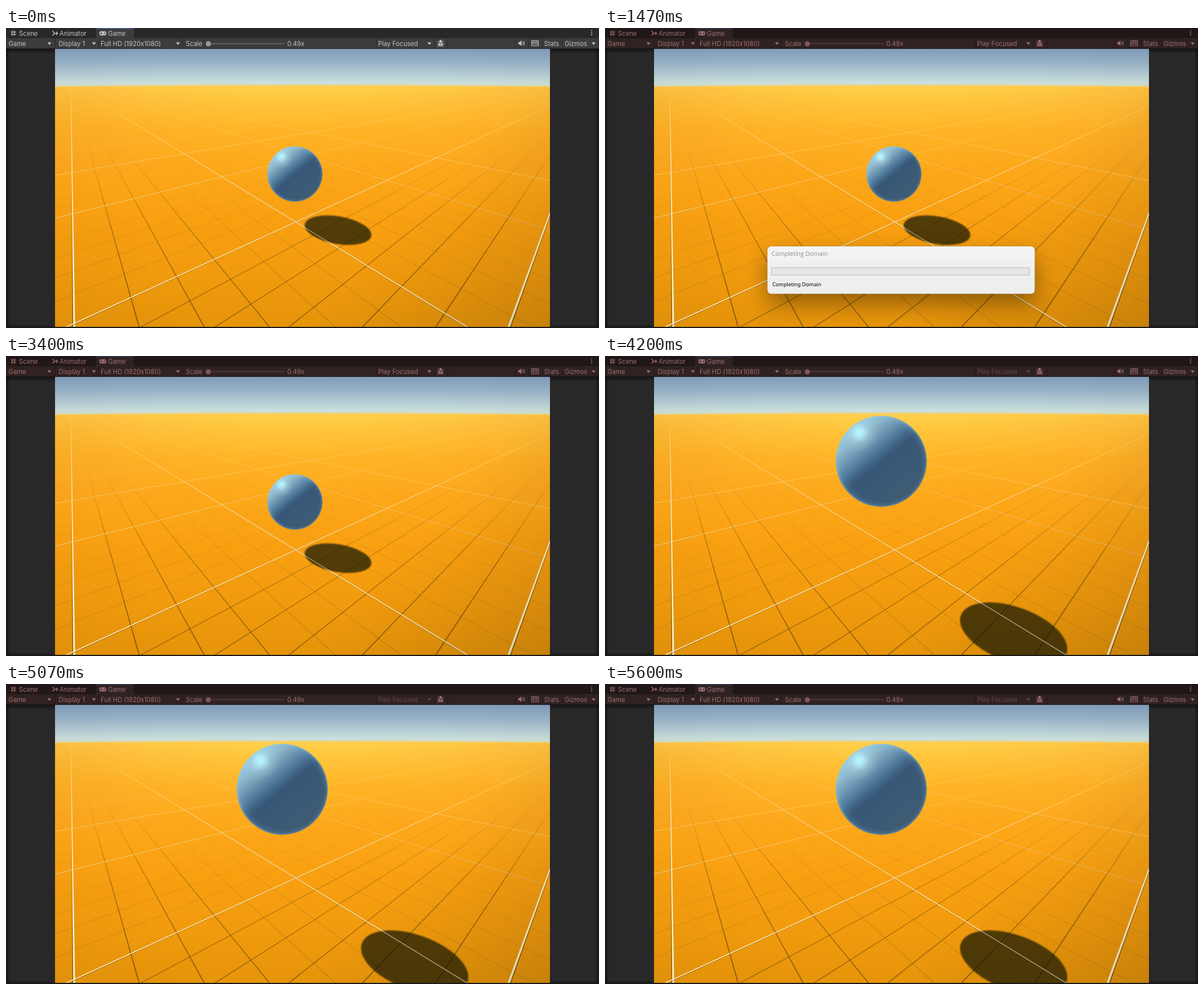
An HTML page with a canvas for the animation above (5.67 s loop, 1052 px wide and 532 px high).

```html
<!DOCTYPE html>
<html lang="en">
<head>
<meta charset="utf-8">
<title>Editor play mode</title>
<style>
  html, body { margin: 0; width: 100%; height: 100%; overflow: hidden; background: #262626; }
  canvas { display: block; }
</style>
</head>
<body>
<canvas id="stage" width="1052" height="532"></canvas>
<script>
const W = 1052, H = 532, LOOP = 5670;
const VIEW = { x: 87, y: 37, w: 878, h: 493 };
const UI_FONT = '11.25px Inter, sans-serif';
const ctx = document.getElementById('stage').getContext('2d');

const POSES = {
  rest: { ball: [512.5, 259, 48.9], shadow: [589, 358.5, 59.7, 24.3, 9.8] },
  play: { ball: [490, 186.7, 80.7], shadow: [725, 494, 99.5, 48.5, 20] }
};

function layer(paint) {
  const c = document.createElement('canvas');
  c.width = W;
  c.height = H;
  paint(c.getContext('2d'));
  return c;
}

function withStops(gradient, stops) {
  for (const [at, color] of stops) gradient.addColorStop(at, color);
  return gradient;
}

function rect(g, x, y, w, h, fill) {
  g.fillStyle = fill;
  g.fillRect(x, y, w, h);
}

function disc(g, x, y, r, fill) {
  g.fillStyle = fill;
  g.beginPath();
  g.arc(x, y, r, 0, Math.PI * 2);
  g.fill();
}

function path(g, points, color, width = 1) {
  g.strokeStyle = color;
  g.lineWidth = width;
  g.beginPath();
  points.forEach(([x, y], i) => i ? g.lineTo(x, y) : g.moveTo(x, y));
  g.stroke();
}

function label(g, text, x, y, color, font = UI_FONT) {
  g.font = font;
  g.fillStyle = color;
  g.fillText(text, x, y);
}

/* ---------- scene ---------- */

function paintSky(g) {
  rect(g, VIEW.x, VIEW.y, VIEW.w, 80, withStops(g.createLinearGradient(0, 37, 0, 104), [
    [0, '#819dbb'], [0.35, '#97b2c6'], [0.7, '#b6cfd5'], [0.9, '#cbdfdc'], [1, '#d8d9bb']
  ]));
}

function groundPath(g) {
  g.beginPath();
  g.moveTo(VIEW.x, 103.5);
  g.quadraticCurveTo(526, 98, 965, 103.5);
  g.lineTo(965, 530);
  g.lineTo(VIEW.x, 530);
  g.closePath();
}

function paintGround(g) {
  groundPath(g);
  g.fillStyle = withStops(g.createLinearGradient(0, 101, 0, 530), [
    [0, '#fbcf68'], [0.012, '#ffd04a'], [0.07, '#ffc53c'], [0.18, '#ffb526'],
    [0.35, '#fda819'], [0.55, '#f9a011'], [0.8, '#f09a0d'], [1, '#e6940a']
  ]);
  g.fill();
  const side = 'rgba(250,160,35,0.3)', none = 'rgba(250,160,35,0)';
  g.fillStyle = withStops(g.createLinearGradient(87, 0, 965, 0), [
    [0, side], [0.4, none], [0.6, none], [1, side]
  ]);
  g.fillRect(VIEW.x, 105, VIEW.w, 150);
}

// A floor line runs from its vanishing point to x at y = 530, widening on the way.
function floorLine(g, vx, x, width, fill) {
  const far = 100, near = 530, reach = 3;
  const endX = vx + (x - vx) * reach, endY = far + (near - far) * reach;
  const half = width * reach / 2, tip = 0.35;
  g.fillStyle = fill;
  g.beginPath();
  g.moveTo(vx - tip, far);
  g.lineTo(vx + tip, far);
  g.lineTo(endX + half, endY);
  g.lineTo(endX - half, endY);
  g.fill();
}

function fade(g, rgb, alphas) {
  const at = [0.02, 0.15, 0.35, 0.6, 1];
  return withStops(g.createLinearGradient(0, 100, 0, 530),
    at.map((p, i) => [p, `rgba(${rgb},${alphas[i]})`]));
}

// Every sixth line is a major one; gaps grow slightly away from the first.
const GROWTH = 0.011;
const FAMILIES = [
  { vx: 115, first: 6, gap: 689, from: -6, to: 24, white: 2.8, dark: 1.7, side: -2.2, strong: x => x < 500 },
  { vx: 1048, first: -156, gap: -774, from: -1, to: 32, white: 3.6, dark: 2.2, side: 2.8, strong: x => x > 110 }
];

function eachLine(visit) {
  for (const f of FAMILIES) {
    for (let k = f.from; k <= f.to; k++) {
      const n = k / 6;
      visit(f, f.vx + (f.first + f.gap * n) / (1 - GROWTH * n), k % 6 === 0);
    }
  }
}

function paintMinor(g) {
  const strong = fade(g, '84,58,8', [0, 0.02, 0.2, 0.48, 0.6]);
  const weak = fade(g, '110,84,30', [0, 0.02, 0.12, 0.24, 0.32]);
  const pale = fade(g, '255,226,150', [0.06, 0.12, 0.08, 0, 0]);
  eachLine((f, x, major) => {
    if (major) return;
    floorLine(g, f.vx, x, f.dark, pale);
    floorLine(g, f.vx, x, f.dark, f.strong(x) ? strong : weak);
  });
}

function paintMajor(g) {
  const white = fade(g, '255,243,205', [0.2, 0.65, 0.9, 1, 1]);
  const bevel = fade(g, '84,58,8', [0, 0, 0.12, 0.45, 0.65]);
  eachLine((f, x, major) => {
    if (!major) return;
    floorLine(g, f.vx, x + f.side, f.dark, bevel);
    floorLine(g, f.vx, x, f.white, white);
  });
}

function paintShadow(g, [x, y, rx, ry, deg], alpha) {
  g.save();
  g.filter = 'blur(0.8px)';
  g.fillStyle = `rgba(12,19,6,${alpha})`;
  g.beginPath();
  g.ellipse(x, y, rx, ry, deg * Math.PI / 180, 0, Math.PI * 2);
  g.fill();
  g.restore();
}

function paintBall(g, [x, y, r]) {
  const dx = r * 0.63, dy = r * 0.775;
  disc(g, x, y, r, withStops(g.createLinearGradient(x - dx, y - dy, x + dx, y + dy), [
    [0, '#a3d3e4'], [0.14, '#8fb8cb'], [0.25, '#749bb4'], [0.35, '#5681a1'],
    [0.43, '#43698b'], [0.51, '#385776'], [0.75, '#3a5a77'], [1, '#415c72']
  ]));
  const hx = x - r * 0.49, hy = y - r * 0.64;
  g.save();
  g.beginPath();
  g.arc(x, y, r, 0, Math.PI * 2);
  g.clip();
  disc(g, hx, hy, r * 0.45, withStops(g.createRadialGradient(hx, hy, 0, hx, hy, r * 0.45), [
    [0, 'rgba(186,248,255,1)'], [0.22, 'rgba(180,242,252,0.85)'],
    [0.55, 'rgba(172,216,230,0.35)'], [1, 'rgba(160,200,220,0)']
  ]));
  // Rim light, strongest on the lit side.
  disc(g, x, y, r, withStops(g.createRadialGradient(x + r * 0.05, y + r * 0.05, r * 0.84, x, y, r), [
    [0, 'rgba(130,190,225,0)'], [0.7, 'rgba(130,190,225,0.14)'], [1, 'rgba(140,200,235,0.55)']
  ]));
  g.restore();
}

function paintVignette(g) {
  g.fillStyle = withStops(g.createRadialGradient(526, 260, 300, 526, 260, 560), [
    [0, 'rgba(40,25,0,0)'], [1, 'rgba(40,25,0,0.04)']
  ]);
  g.fillRect(VIEW.x, VIEW.y, VIEW.w, VIEW.h);
  g.fillStyle = withStops(g.createLinearGradient(690, 360, 930, 600), [
    [0, 'rgba(60,40,0,0)'], [1, 'rgba(60,40,0,0.16)']
  ]);
  g.fillRect(VIEW.x, 105, VIEW.w, 425);
}

function paintScene(g, pose) {
  g.save();
  g.beginPath();
  g.rect(VIEW.x, VIEW.y, VIEW.w, VIEW.h);
  g.clip();
  paintSky(g);
  paintGround(g);
  g.save();
  groundPath(g);
  g.clip();
  paintMinor(g);
  paintShadow(g, pose.shadow, 0.54);
  paintMajor(g);
  paintShadow(g, pose.shadow, 0.35);
  g.restore();
  paintVignette(g);
  paintBall(g, pose.ball);
  g.restore();
}

/* ---------- editor frame ---------- */

const INK = '#c4c4c4';

function arrow(g, x, color = INK) {
  g.fillStyle = color;
  g.beginPath();
  g.moveTo(x - 3.5, 25.5);
  g.lineTo(x + 3.5, 25.5);
  g.lineTo(x, 30);
  g.fill();
}

function paintIcons(g) {
  // Scene grid
  for (const d of [-2, 2]) {
    path(g, [[13 + d, 4.5], [13 + d, 14]], INK, 1.2);
    path(g, [[8.5, 9.2 + d], [18, 9.2 + d]], INK, 1.2);
  }
  // Animator branch
  path(g, [[82.5, 5], [86, 9.5], [91.5, 9.5]], INK, 1.3);
  path(g, [[82.5, 13.5], [86, 9.5]], INK, 1.3);
  path(g, [[89, 6.8], [91.8, 9.5], [89, 12.2]], INK, 1.3);
  // Gamepad
  g.fillStyle = INK;
  g.beginPath();
  g.roundRect(165.5, 5.8, 12.5, 7.4, 3.6);
  g.fill();
  path(g, [[167, 9.5], [171, 9.5]], '#3c3c3c', 1);
  path(g, [[169, 7.5], [169, 11.5]], '#3c3c3c', 1);
  disc(g, 174, 10.4, 0.9, '#3c3c3c');
  disc(g, 175.6, 8.5, 0.9, '#3c3c3c');
  // Menu dots
  for (const y of [4.8, 8.5, 12.2]) disc(g, 1039, y, 1.1, INK);
  // Bug
  g.fillStyle = INK;
  g.beginPath();
  g.ellipse(771, 28.5, 3.6, 4.6, 0, 0, Math.PI * 2);
  g.fill();
  disc(g, 771, 23.3, 2.3, INK);
  for (const s of [-1, 1]) {
    path(g, [[771 + s * 3, 26], [771 + s * 5.5, 23]], INK, 1.1);
    path(g, [[771 + s * 3, 28.5], [771 + s * 6.3, 28.5]], INK, 1.1);
    path(g, [[771 + s * 3, 30.5], [771 + s * 5.5, 33.5]], INK, 1.1);
  }
  path(g, [[768, 26.5], [774, 26.5]], '#3c3c3c', 0.8);
  path(g, [[771, 27], [771, 33]], '#3c3c3c', 0.8);
  // Speaker
  g.fillStyle = INK;
  g.beginPath();
  [[909, 25], [911, 25], [914.5, 22], [914.5, 32], [911, 29], [909, 29]].forEach(p => g.lineTo(...p));
  g.fill();
  for (const r of [2.4, 4.8]) {
    g.strokeStyle = INK;
    g.lineWidth = 1.1;
    g.beginPath();
    g.arc(914.8, 27, r, -0.9, 0.9);
    g.stroke();
  }
  // Keyboard
  g.strokeStyle = INK;
  g.lineWidth = 1;
  g.strokeRect(932.5, 22.5, 12, 9);
  for (const y of [25.5, 28.5]) path(g, [[932, y], [945, y]], INK, 0.8);
  for (const x of [935.5, 938.5, 941.5]) path(g, [[x, 23], [x, 28.5]], INK, 0.8);
}

function paintBars(g, playing) {
  rect(g, 0, 0, W, 18, '#282828');
  rect(g, 160, 0, 67, 18, '#3c3c3c');
  rect(g, 160, 0, 67, 1.6, '#3a6096');
  rect(g, 1, 18, 1050, 18, '#3c3c3c');
  rect(g, 0, 36, W, 1, '#202020');
  for (const x of [87, 164, 313, 657, 760, 783, 903, 927, 951, 987]) rect(g, x, 18, 1, 18, '#2b2b2b');

  label(g, 'Scene', 23, 14, INK);
  label(g, 'Animator', 95, 14, INK);
  label(g, 'Game', 181, 14, INK);
  label(g, 'Game', 4.5, 32, INK);
  label(g, 'Display 1', 93.5, 32, INK);
  label(g, 'Full HD (1920x1080)', 168, 32, INK);
  label(g, 'Scale', 319, 32, INK);
  label(g, '0.49x', 499, 32, INK);
  label(g, 'Stats', 954.5, 32, INK);
  label(g, 'Gizmos', 991, 32, INK);
  const focusInk = playing ? '#7c7c7c' : INK;
  label(g, 'Play Focused', 660, 32, focusInk);
  arrow(g, 751, focusInk);
  for (const x of [77, 156, 305, 1042.5]) arrow(g, x);

  rect(g, 359, 27, 135, 1.5, '#6a6a6a');
  disc(g, 359, 28, 4.7, '#999');
  paintIcons(g);
}

function paintPanels(g) {
  rect(g, 0, 0, W, H, '#282828');
  const shade = (x0, y0, x1, y1, x, y, w, h) => rect(g, x, y, w, h,
    withStops(g.createLinearGradient(x0, y0, x1, y1), [[0, 'rgba(0,0,0,0.5)'], [1, 'rgba(0,0,0,0)']]));
  shade(0, 0, 7, 0, 0, 37, 7, 495);
  shade(W, 0, W - 7, 0, W - 7, 37, 7, 495);
  shade(0, 37, 0, 45, 0, 37, W, 8);
  shade(0, H, 0, H - 6, 0, H - 6, W, 6);
  rect(g, 0, 530, W, 2, '#191919');
}

function paintWindow(g, pose, tinted, playing) {
  paintPanels(g);
  paintScene(g, pose);
  paintBars(g, playing);
  if (tinted) {
    g.globalCompositeOperation = 'multiply';
    rect(g, 0, 0, W, 37, 'rgb(204,143,143)');
    g.globalCompositeOperation = 'source-over';
  }
}

/* ---------- dialog ---------- */

function dialogTexts(t) {
  if (t >= 1270 && t < 1470) return ['Reloading Domain', 'Reloading Domain'];
  if (t >= 1470 && t < 3130) return ['Completing Domain', 'Completing Domain'];
  return ['Hold on...', 'Importing assets'];
}

function dialogState(t) {
  if (t < 730 || t >= 3400) return null;
  if (t >= 3330) return { alpha: 0.25, scale: 0.93 };
  if (t >= 3270) return { alpha: 0.65, scale: 0.97 };
  const passed = [730, 800, 870, 930, 1000].filter(s => t >= s).length;
  const p = 1 - (1 - passed / 5) ** 2;
  return { alpha: p, scale: 0.9 + 0.1 * p };
}

const dialogLayers = new Map();

function dialogLayer([title, body]) {
  if (!dialogLayers.has(title)) {
    dialogLayers.set(title, layer(g => {
      g.save();
      g.shadowColor = 'rgba(0,0,0,0.38)';
      g.shadowBlur = 38;
      g.shadowOffsetY = 18;
      g.fillStyle = withStops(g.createLinearGradient(0, 387, 0, 471), [
        [0, '#f4f4f4'], [0.31, '#f2f2f2'], [0.33, '#f0f0f0'], [1, '#eeeeee']
      ]);
      g.beginPath();
      g.roundRect(288, 387, 474.5, 84.5, 7);
      g.fill();
      g.restore();
      g.strokeStyle = 'rgba(90,70,30,0.35)';
      g.lineWidth = 0.6;
      g.stroke();
      label(g, title, 295.5, 404, '#8b8b8b', '10.7px "Open Sans", sans-serif');
      rect(g, 295, 424.5, 458.5, 14, '#b9b9b9');
      rect(g, 296, 425.5, 456.5, 12, '#e6e6e6');
      label(g, body, 297, 458, '#000', '9.2px "Noto Sans", sans-serif');
    }));
  }
  return dialogLayers.get(title);
}

/* ---------- timeline ---------- */

const windows = {
  idle: layer(g => paintWindow(g, POSES.rest, false, false)),
  loading: layer(g => paintWindow(g, POSES.rest, true, false)),
  playing: layer(g => paintWindow(g, POSES.play, true, true))
};

function draw(t) {
  const mode = t < 470 ? 'idle' : t < 4200 ? 'loading' : 'playing';
  ctx.drawImage(windows[mode], 0, 0);
  const dialog = dialogState(t);
  if (!dialog) return;
  const cx = 525, cy = 429;
  ctx.save();
  ctx.globalAlpha = dialog.alpha;
  ctx.translate(cx, cy);
  ctx.scale(dialog.scale, dialog.scale);
  ctx.drawImage(dialogLayer(dialogTexts(t)), -cx, -cy);
  ctx.restore();
}

const start = performance.now();
function tick() {
  draw((performance.now() - start) % LOOP);
  requestAnimationFrame(tick);
}
tick();
</script>
</body>
</html>
```
